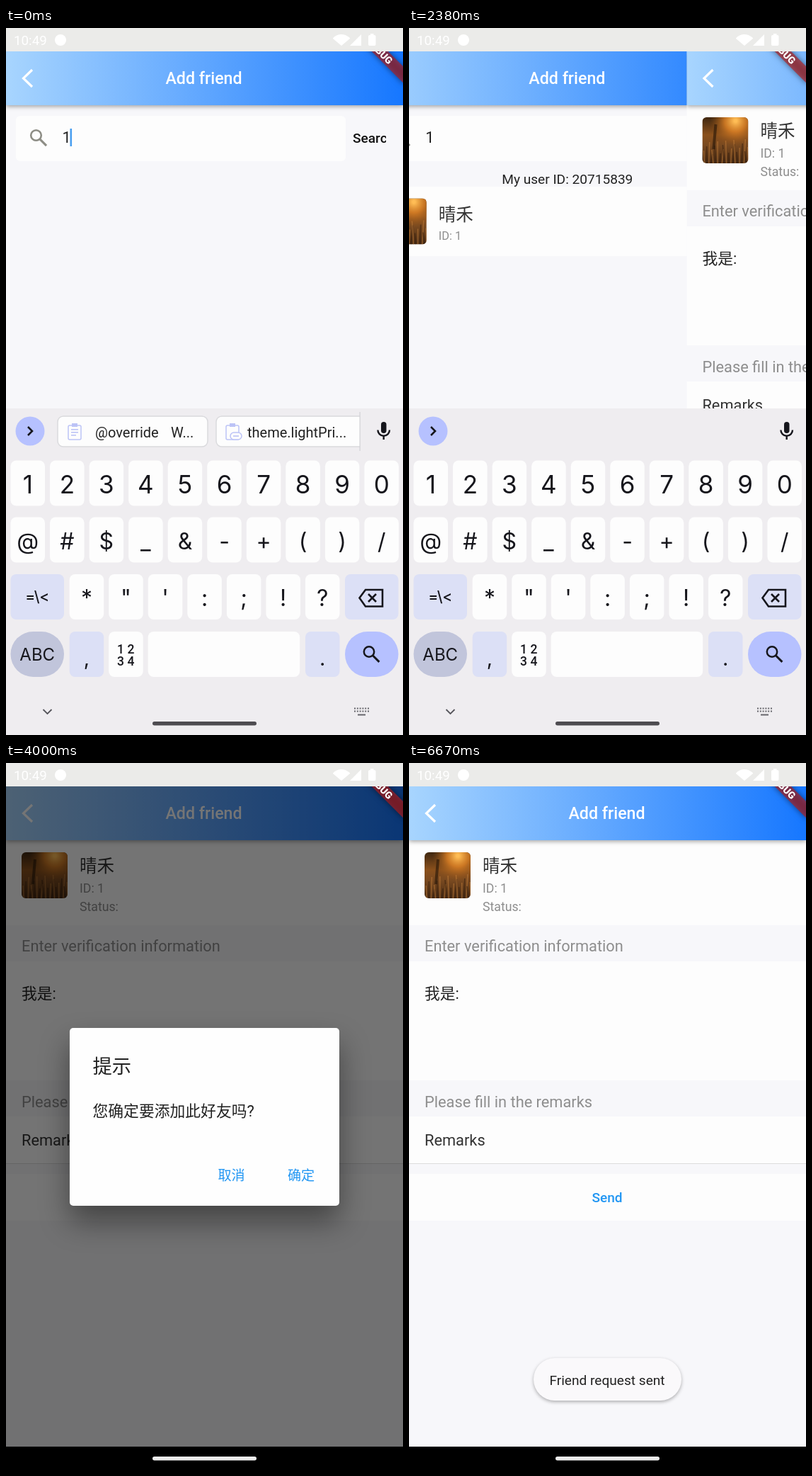
Recreate the animation shown at these times as an HTML page with a canvas. Size 561 by 998 pixels, loop 6710 ms.

```html
<!DOCTYPE html>
<html lang="zh-CN">
<head>
<meta charset="utf-8">
<title>Add friend</title>
<style>
html, body { margin: 0; width: 100%; height: 100%; overflow: hidden; background: #f7f7fa; }
canvas { display: block; }
</style>
</head>
<body>
<canvas id="stage" width="561" height="998"></canvas>
<script>
const W = 561, H = 998, LOOP = 6710;
const UI = 'Roboto, "Noto Sans CJK SC", "Noto Sans CJK", sans-serif';
const KEY = 'Inter, Roboto, sans-serif';
const PAGE = '#f7f7fa', PANEL = '#fdfdfd', BLUE = '#2196f3', GREY = '#8e8e8e', INK = '#222';
const NAME = '晴禾';

// Moments in ms
const RESULT = 1350, PUSH = 2335, HIDE = 2440, ASK = 3408, CONFIRM = 5520, TOAST = 6000;

const screen = document.getElementById('stage').getContext('2d');
let g = screen;

const clamp = x => Math.max(0, Math.min(1, x));
const ramp = (t, start, length) => clamp((t - start) / length);

function bezier(x1, y1, x2, y2) {
  const at = (a, b, s) => 3 * (1 - s) * (1 - s) * s * a + 3 * (1 - s) * s * s * b + s ** 3;
  return x => {
    let lo = 0, hi = 1;
    for (let i = 0; i < 20; i++) {
      const mid = (lo + hi) / 2;
      if (at(x1, x2, mid) < x) lo = mid; else hi = mid;
    }
    return x >= 1 ? 1 : at(y1, y2, lo);
  };
}
const ease = bezier(.25, .1, .25, 1);
const easeOut = bezier(0, 0, .58, 1);
const easeIn = bezier(.4, 0, 1, 1);
const slide = bezier(.35, .91, .33, .97);

function rect(x, y, w, h, color) {
  g.fillStyle = color;
  g.fillRect(x, y, w, h);
}

function round(x, y, w, h, r, fill, stroke) {
  g.beginPath();
  g.roundRect(x, y, w, h, r);
  if (fill) { g.fillStyle = fill; g.fill(); }
  if (stroke) { g.strokeStyle = stroke; g.lineWidth = 1.5; g.stroke(); }
}

function circle(x, y, r, color) {
  g.beginPath();
  g.arc(x, y, r, 0, 7);
  g.fillStyle = color;
  g.fill();
}

function line(points, color, width, closed) {
  g.beginPath();
  for (let i = 0; i < points.length; i += 2) g.lineTo(points[i], points[i + 1]);
  if (closed) g.closePath();
  g.strokeStyle = color;
  g.lineWidth = width;
  g.stroke();
}

function poly(points, color) {
  g.beginPath();
  for (let i = 0; i < points.length; i += 2) g.lineTo(points[i], points[i + 1]);
  g.fillStyle = color;
  g.fill();
}

function text(s, x, y, size, color, { weight = 400, align = 'left', font = UI } = {}) {
  g.font = `${weight} ${size}px ${font}`;
  g.textAlign = align;
  g.fillStyle = color;
  g.fillText(s, x, y);
}

function shadow(color, blur, dy) {
  g.shadowColor = color;
  g.shadowBlur = blur;
  g.shadowOffsetY = dy;
}

function scoped(draw) {
  g.save();
  draw();
  g.restore();
}

function magnifier(x, y, r, color, width) {
  g.beginPath();
  g.arc(x, y, r, 0, 7);
  g.strokeStyle = color;
  g.lineWidth = width;
  g.stroke();
  line([x + r * .7, y + r * .7, x + r * 2, y + r * 2], color, width + .5);
}

function photo(x, y) {
  scoped(() => {
    g.beginPath();
    g.roundRect(x, y, 65, 65, 6);
    g.clip();
    const field = g.createLinearGradient(0, y, 0, y + 65);
    field.addColorStop(0, '#3f2710');
    field.addColorStop(.38, '#8a501c');
    field.addColorStop(.6, '#7a4a20');
    field.addColorStop(1, '#4a2c14');
    rect(x, y, 65, 65, field);
    const sun = g.createRadialGradient(x + 47, y + 5, 2, x + 47, y + 5, 36);
    sun.addColorStop(0, '#ffbd55');
    sun.addColorStop(.4, 'rgba(226,132,38,.8)');
    sun.addColorStop(1, 'rgba(150,85,25,0)');
    rect(x, y, 65, 65, sun);
    for (let i = 0; i < 22; i++) {
      const px = x + i * 3.1, top = y + 30 + (i * 17 % 23);
      line([px, y + 65, px + (i % 5) - 2, top], i % 2 ? 'rgba(200,130,60,.5)' : 'rgba(45,25,10,.5)', 1.5);
    }
    line([x + 16, y + 45, x + 19, y + 10], 'rgba(35,20,8,.6)', 4);
  });
}

function header() {
  scoped(() => {
    shadow('rgba(0,0,0,.35)', 6, 2);
    const fill = g.createLinearGradient(0, 0, W, 0);
    fill.addColorStop(0, '#a8d5fe');
    fill.addColorStop(1, '#1677ff');
    rect(0, 33, W, 76, fill);
  });
  line([37, 59, 24.5, 71, 37, 83], '#fff', 3.2);
  text('Add friend', 279.5, 79, 23.2, '#fff', { weight: 500, align: 'center' });
}

function searchPage(t) {
  rect(0, 0, W, H, PAGE);
  round(14, 124, 466, 64, 6, PANEL);
  magnifier(42.5, 151.5, 7.3, '#8d8d85', 2.6);
  text('1', 79.5, 162, 21.8, INK);
  scoped(() => {
    g.beginPath();
    g.rect(480, 130, 57, 50);
    g.clip();
    text('Search', 490, 162, 19.1, '#111', { weight: 500 });
  });
  if (t < RESULT) {
    const p = t % 1000;
    g.globalAlpha = 1 - ramp(p, 500, 180) + ramp(p, 820, 180);
    rect(90.5, 142, 2.6, 25, '#4a9ff0');
    g.globalAlpha = 1;
  } else {
    text('My user ID: 20715839', 280, 220, 19.1, INK, { align: 'center' });
    rect(0, 224, W, 98, PANEL);
    photo(16, 240.5);
    text(NAME, 98, 272, 24.5, '#333');
    text('ID: 1', 98, 299, 16.4, GREY);
  }
  header();
}

function requestPage(t) {
  rect(0, 0, W, H, PAGE);
  for (const [y, h] of [[109, 120], [280, 168], [499, 66], [580, 66]]) rect(0, y, W, h, PANEL);
  rect(0, 565, W, 1, '#dcdcdc');
  photo(22, 126);
  text(NAME, 104, 154, 24.5, '#333');
  text('ID: 1', 104, 183, 17.7, GREY);
  text('Status:', 104, 209, 17.7, GREY);
  text('Enter verification information', 22, 266, 21.8, GREY);
  text('我是:', 22, 333, 21.8, INK);
  text('Please fill in the remarks', 22, 486, 21.8, GREY);
  text('Remarks', 22, 539.5, 21.8, '#333');
  const press = ramp(t, 3340, 80) - ramp(t, 3550, 200);
  if (press > 0) round(95, 588, 368, 49, 4, `rgba(33,150,243,${.2 * press})`);
  text('Send', 280, 619.5, 19.1, BLUE, { weight: 500, align: 'center' });
  header();
}

function key(x, y, w, label, { size = 35, color = PANEL, r = 8, base = 46, weight = 400 } = {}) {
  round(x, y, w, 64, r, color);
  text(label, x + w / 2, y + base, size, '#16161c', { align: 'center', font: KEY, weight });
}

function clipboard(x, y, color) {
  round(x - 9, y - 9, 18, 20, 2, null, color);
  rect(x - 4, y - 12, 8, 5, color);
}

function chips() {
  const mark = '#bcc3f6';
  round(73, 548, 212, 43, 8, PANEL, '#dadadd');
  clipboard(97, 570, mark);
  for (let i = 0; i < 3; i++) rect(92, 566 + i * 4, i < 2 ? 10 : 7, 1.6, mark);
  text('@override', 126, 577.5, 20, INK);
  text('W...', 233, 577.5, 20, INK);
  scoped(() => {
    g.beginPath();
    g.rect(290, 540, 210, 60);
    g.clip();
    round(297, 548, 225, 43, 8, PANEL, '#dadadd');
  });
  clipboard(320, 570, mark);
  round(317, 571, 16, 10, 5, PANEL, mark);
  rect(321, 575.2, 8, 1.6, mark);
  text('theme.lightPri...', 341, 577.5, 20, INK);
  rect(499.5, 542, 1.2, 55, '#d2d2d5');
}

function keyboard(t) {
  const dark = '#16161c', soft = '#dce0f6', accent = '#b6c1ff', pitch = 55.55;
  rect(0, 537, W, H - 537, '#efedf0');
  circle(34, 569, 20.5, accent);
  line([31, 563, 37, 569, 31, 575], dark, 2.6);
  if (t < RESULT) chips();

  round(530, 556, 7.5, 16, 4, dark);
  g.beginPath();
  g.arc(533.7, 567.5, 8.3, 0, Math.PI);
  g.strokeStyle = dark;
  g.lineWidth = 2.4;
  g.stroke();
  line([533.7, 575, 533.7, 581], dark, 2.4);

  [...'1234567890'].forEach((c, i) => key(6.5 + i * pitch, 610.5, 48.5, c));
  [...'@#$_&-+()/'].forEach((c, i) => key(6.5 + i * pitch, 690.5, 48.5, c, { size: 32, base: 45 }));
  [...'*"\':;!?'].forEach((c, i) => key(89.7 + i * pitch, 771, 48.5, c, { size: 32, base: 45 }));
  key(6.5, 771, 75.5, '=\\<', { size: 21, color: soft, base: 39, weight: 500 });
  key(479, 771, 75.5, '', { color: soft });
  line([499.5, 804.5, 508, 793, 532, 793, 532, 816.5, 508, 816.5], dark, 2.6, true);
  line([512, 799, 523, 810], dark, 2.6);
  line([523, 799, 512, 810], dark, 2.6);

  key(6.5, 852, 75.5, 'ABC', { size: 24, color: '#c1c5db', r: 32, base: 41 });
  key(89.7, 852, 48.5, ',', { size: 29, color: soft, base: 48 });
  key(145.2, 852, 48.5, '');
  [...'1234'].forEach((c, i) =>
    text(c, 162 + i % 2 * 14.5, 883 + (i >> 1) * 17, 17.5, dark, { weight: 500, align: 'center' }));
  key(200.7, 852, 214.5, '');
  key(423, 852, 48.5, '.', { size: 29, color: soft, base: 48 });
  key(479, 852, 75.5, '', { color: accent, r: 32 });
  magnifier(513, 880.5, 7.2, dark, 2.5);

  line([52.5, 962, 58.5, 968, 64.5, 962], '#55555b', 1.8);
  for (let i = 0; i < 12; i++) rect(492 + i % 6 * 3.8, 959.5 + (i > 5) * 4, 2, 2, '#66666c');
  rect(497, 968.5, 11, 2, '#66666c');
}

function statusBar() {
  rect(0, 0, W, 33, '#ebebe9');
  text('10:49', 11, 24, 18.8, '#fff');
  circle(77, 17, 8, '#fff');
  g.beginPath();
  g.moveTo(474, 25);
  g.arc(474, 25, 16, -Math.PI * .75 - .08, -Math.PI * .25 + .08);
  g.fillStyle = '#fff';
  g.fill();
  poly([486, 25, 502, 9, 502, 25], '#fff');
  round(512, 10, 10.5, 15, 2, '#fff');
  rect(515, 8, 4.5, 3, '#fff');
}

function banner() {
  scoped(() => {
    g.beginPath();
    g.rect(0, 33, W, 200);
    g.clip();
    g.translate(W, 0);
    g.rotate(Math.PI / 4);
    scoped(() => {
      shadow('rgba(0,0,0,.8)', 8, 0);
      rect(-56, 38.2, 112, 16.4, 'rgba(183,28,28,.63)');
    });
    text('DEBUG', 0, 51.2, 13.9, '#fff', { weight: 900, align: 'center' });
  });
}

function toast(alpha) {
  scoped(() => {
    g.globalAlpha = alpha;
    scoped(() => {
      shadow('rgba(0,0,0,.3)', 5, 2);
      round(176, 840, 209, 60, 30, '#faf9fb');
    });
    text('Friend request sent', 280, 877.5, 19.1, INK, { align: 'center' });
  });
}

// Rendered apart so that it fades as one piece
function makeDialog() {
  const layer = document.createElement('canvas');
  layer.width = W;
  layer.height = H;
  g = layer.getContext('2d');
  scoped(() => {
    shadow('rgba(0,0,0,.42)', 42, 22);
    round(90, 374, 381, 251, 5, '#fefefe');
  });
  text('提示', 122.5, 437.5, 27.3, INK);
  text('您确定要添加此好友吗?', 122.5, 499, 21.8, INK);
  text('取消', 299.5, 589, 19.1, BLUE);
  text('确定', 398, 589, 19.1, BLUE);
  g = screen;
  return layer;
}
const dialog = makeDialog();

function draw(t) {
  const p = t < PUSH ? 0 : slide(ramp(t, PUSH, 400));
  if (p < 1) scoped(() => { g.translate(-p * W / 3, 0); searchPage(t); });
  if (p > 0) scoped(() => {
    g.translate((1 - p) * W, 0);
    g.beginPath();
    g.rect(0, 0, W, H);
    g.clip();
    requestPage(t);
  });

  const open = ramp(t, ASK, 150) - ramp(t, CONFIRM, 150);
  if (open > 0) {
    rect(0, 33, W, 932, `rgba(0,0,0,${.54 * ease(open)})`);
    g.globalAlpha = easeOut(open);
    g.drawImage(dialog, 0, 0);
    g.globalAlpha = 1;
  }
  if (t > TOAST) toast(ramp(t, TOAST, 200));

  rect(0, 965, W, 33, '#000');
  const hide = ramp(t, HIDE, 240);
  if (hide < 1) scoped(() => { g.translate(0, 461 * easeIn(hide)); keyboard(t); });
  round(207, 979, 147, 5.5, 2.75, hide < .6 ? '#4e4c51' : open > 0 && t < 3600 ? '#d8d8d8' : '#ececec');
  banner();
  statusBar();
}

function frame() {
  draw(performance.now() % LOOP);
  requestAnimationFrame(frame);
}
frame();
</script>
</body>
</html>
```
